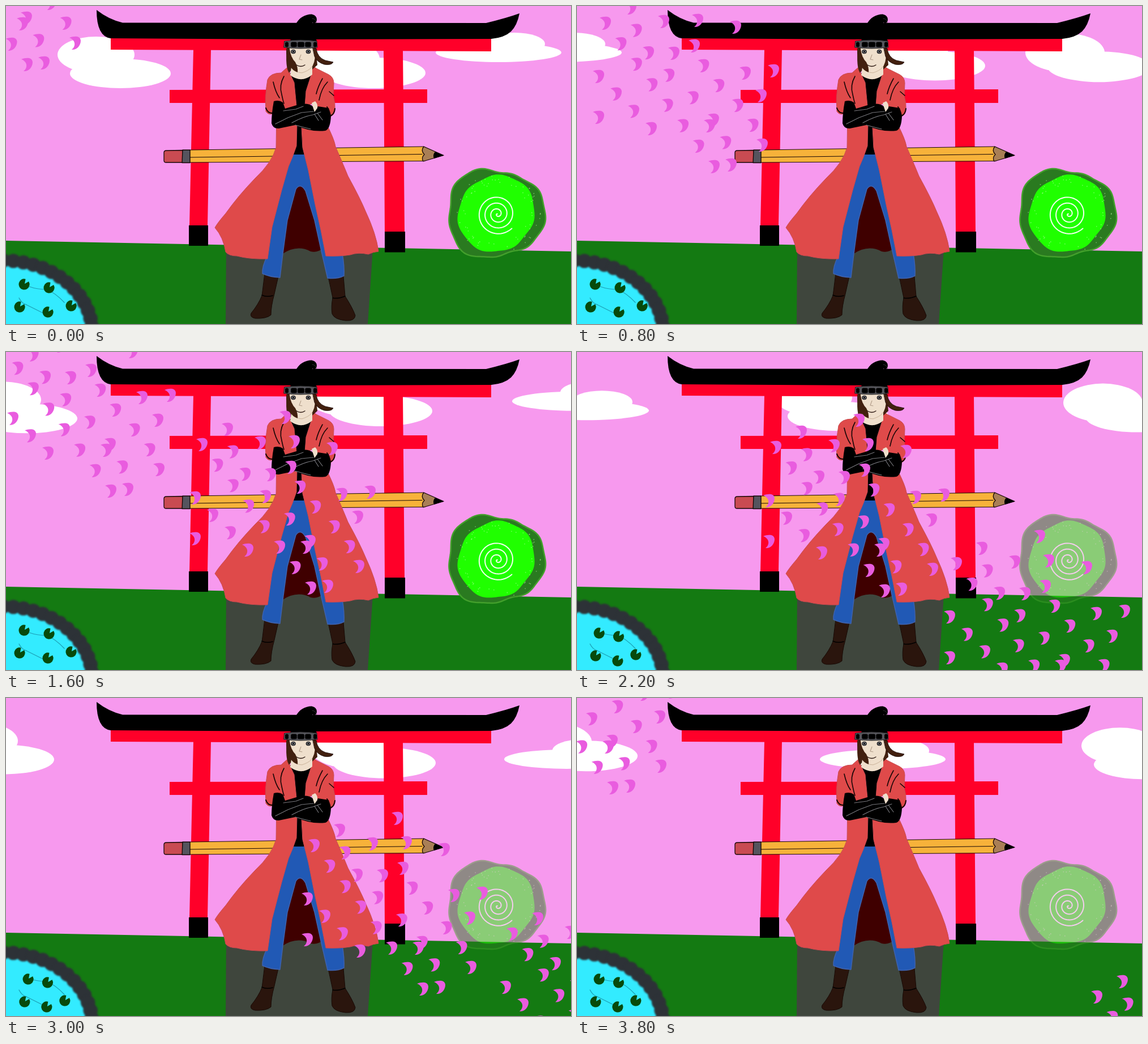
Write an HTML page with a canvas that moves like this. It is 998 by 561 pixels and loops after 4 s.

```html
<!DOCTYPE html>
<html lang="en">
<head>
<meta charset="utf-8">
<title>Gate and petals</title>
<style>
html, body { margin: 0; width: 100%; height: 100%; overflow: hidden; background: #f799ee; }
canvas { display: block; width: 998px; height: 561px; }
</style>
</head>
<body>
<canvas id="stage" width="998" height="561"></canvas>
<script>
const W = 998, H = 561, STEP = 200, STEPS = 20, TAU = Math.PI * 2;
const { sin, cos, exp } = Math;
const ctx = document.getElementById('stage').getContext('2d');

function shape(c, d, fill, line, width = 1) {
  const p = new Path2D(d);
  if (fill) { c.fillStyle = fill; c.fill(p); }
  if (line) { c.strokeStyle = line; c.lineWidth = width; c.stroke(p); }
}

function oval(c, x, y, rx, ry, fill) {
  c.fillStyle = fill;
  c.beginPath();
  c.ellipse(x, y, rx, ry, 0, 0, TAU);
  c.fill();
}

function layer(paint) {
  const cv = document.createElement('canvas');
  cv.width = W; cv.height = H;
  const c = cv.getContext('2d');
  c.lineCap = c.lineJoin = 'round';
  paint(c);
  return cv;
}

// Piecewise linear value at step k; the end segments run on
function at(steps, values, k) {
  let i = 0;
  while (i < steps.length - 2 && k > steps[i + 1]) i++;
  const f = (k - steps[i]) / (steps[i + 1] - steps[i]);
  return values[i] + (values[i + 1] - values[i]) * f;
}

// Clouds travel right and wrap; x is unwrapped, each puff is [dx, dy, rx, ry]
const marks = [0, 4, 8, 11, 13, 15, 19];
const clouds = [
  { x: [870, 1268, 2305, 2616, 3147, 3591, 4440],
    y: k => 82 + 26 / (1 + exp(9.5 - k)),
    puffs: [[28, -15, 54, 20], [0, 0, 111, 17]] },
  { x: [650, 922, 1962, 2289, 2798, 3268, 3916],
    y: k => 110 + 8 * cos(TAU * k / 13),
    puffs: [[-60, -25, 70, 34], [0, 0, 91, 27]] },
  { x: [202, 632, 1337, 1761, 2269, 2596, 3602],
    y: k => 112 + 7 * cos(TAU * k / 9),
    puffs: [[-43, -33, 68, 32], [0, 0, 89, 26]] }
];

function drawClouds(k) {
  for (const { x, y, puffs } of clouds) {
    const cx = (at(marks, x, k) + 150) % 1300 - 150;
    for (const [dx, dy, rx, ry] of puffs) oval(ctx, cx + dx, y(k) + dy, rx, ry, '#fff');
  }
}

// A flock is a few diagonal strings of petals: from, to, count, sideways swing
const strings = [
  [50, 30, 242, 283, 8, 0], [95, 3, 272, 280, 8, -20], [207, 70, 327, 245, 6, -8],
  [38, 124, 131, 216, 4, 0], [153, 27, 171, 83, 2, 0], [197, -18, 347, 114, 2, 0],
  [213, 25, 280, 37, 2, 0], [297, 118, 325, 158, 2, 0], [38, 196, 234, 211, 2, 0]
];
const flock = strings.flatMap(([x0, y0, x1, y1, n, swing]) => Array.from({ length: n }, (_, i) => {
  const f = i / (n - 1);
  return [x0 + (x1 - x0) * f + swing * sin(TAU * f), y0 + (y1 - y0) * f];
}));
const drifts = [
  { steps: [0, 4, 8, 11, 13, 15], x: [-205, 0, 296, 620, 700, 844], y: [-180, 0, 133, 343, 379, 386] },
  { steps: [8, 11, 13, 15, 19], x: [-57, 301, 380, 494, 868], y: [-38, 138, 185, 230, 497] },
  { steps: [16, 19], x: [-330, -179], y: [-270, -125] }
];
const petal = new Path2D('M-10,-9 C-2,-12 9,-13 10,-4 C10,5 3,13 -6,12 C2,6 1,-5 -10,-9Z');

function drawPetals(k) {
  ctx.fillStyle = '#e95cdf';
  for (const { steps, x, y } of drifts) {
    const dx = at(steps, x, k), dy = at(steps, y, k);
    for (const [px, py] of flock) {
      ctx.save();
      ctx.translate(dx + px, dy + py);
      ctx.fill(petal);
      ctx.restore();
    }
  }
}

// Lily pads huddle together on every other step
const pads = [[32, 491], [76, 497], [24, 531], [115, 529], [74, 540]];

function drawPads(k) {
  const near = k % 2;
  ctx.fillStyle = '#074a0b';
  for (const [px, py] of pads) {
    const x = px + near * (64 - px) * 0.22, y = py + near * 5;
    ctx.beginPath();
    ctx.moveTo(x + 1, y - 1);
    ctx.arc(x, y, 9.6, -0.55, TAU - 1.3);
    ctx.fill();
  }
}

const gate = layer(c => {
  const red = '#ff0029';
  shape(c, 'M0,414L998,433V561H0Z', '#147a12');
  shape(c, 'M389,421L648,428L639,561H388Z', '#3f463d');
  shape(c, 'M331,76H362L356,388H324ZM667,78H701L704,399H669Z', red);
  shape(c, 'M289,148L744,147V171H289ZM185,55L857,57V80L185,77Z', red);
  shape(c, 'M160,7Q182,24 206,29.500L848,30Q885,21 907,13Q903,34 892,45Q880,56 857,58L520,59L185,57Q160,54 160,7Z', '#000');
  shape(c, 'M323,387H357V423H323ZM669,398H705V434.500H669Z', '#000');
});

const portal = layer(c => {
  const ring = (radius, fill, line) => {
    c.beginPath();
    for (let a = 0; a < TAU; a += 0.04) c.lineTo(868 + cos(a) * radius(a), 366 + sin(a) * radius(a));
    c.closePath();
    c.fillStyle = fill;
    c.fill();
    if (line) { c.strokeStyle = line; c.lineWidth = 2.5; c.stroke(); }
  };
  ring(a => 82 + 5 * cos(2 * a) - 2.5 * cos(4 * a) + 4 * (cos(3 * a) - cos(a)) + 1.5 * sin(9 * a), '#2a7a20', '#43a02c');
  ring(a => 67.5 - cos(a) * 2 - 2.5 * sin(2 * a) + 1.3 * sin(7 * a), '#20ff00');

  let seed = 7;
  const rnd = () => (seed = seed * 16807 % 2147483647) / 2147483647;
  c.globalAlpha = 0.45;
  for (let i = 0; i < 70; i++) {
    const a = rnd() * TAU, r = 0.7 + rnd() * 0.27;
    oval(c, 868 + cos(a) * 80 * r, 366 + sin(a) * 71 * r, 0.9, 0.9, '#d6ffc4');
  }
  c.globalAlpha = 1;

  c.strokeStyle = '#f2ffee';
  c.lineWidth = 2;
  c.beginPath();
  const turn = 3.5 * TAU;
  for (let s = 0; s <= turn; s += 0.1) {
    const r = 36 * (1 - s / turn), a = TAU / 8 + s;
    c.lineTo(868 + cos(a) * r, 367 + sin(a) * r);
  }
  c.stroke();
});

const pond = layer(c => {
  c.filter = 'blur(1.4px)';
  oval(c, -5, 575, 152, 120, '#33ebff');
  for (let a = 0; a < 1.6; a += 0.115) oval(c, -5 + 157 * sin(a), 575 - 126 * cos(a), 12.8, 12.5, '#2d3237');
  c.filter = 'none';
  shape(c, 'M41,495Q55,500 72,500Q87,506 103,523M23,515Q28,525 36,527L66,542', null, '#1d9fb6', 1.3);
});

const hero = layer(c => {
  const coat = '#df4a4a', edge = '#c84a50', ink = '#150505', skin = '#efdfcc', hair = '#42200f';

  // Pencil
  shape(c, 'M325,254L738,248L740,273.500L325,276Z', '#f7b23a', ink);
  shape(c, 'M325,267L735,261.500', null, ink, 1.2);
  shape(c, 'M283,255L312,254.500V276L282,276Q279,276 279,272V259Q279,255 283,255Z', '#c94b52', ink, 1.3);
  shape(c, 'M312,254H325V276.500H311Z', '#55545e', ink, 1.3);
  shape(c, 'M738,248L773,263.500L737,274Q733,267 739,262Q732,255 738,248Z', '#a97f56', ink, 1.3);
  shape(c, 'M758,257L773,263.500L756,269Q753,263 758,257Z', '#000');

  // Lining, boots, jeans
  shape(c, 'M510,305H535L560,427Q550,436 538,433Q514,420 487,438L480,437L500,330Z', '#3f0000');
  shape(c, 'M457,474L481,477L474,508Q468,530 468,545Q460,552 440,551Q430,549 433,542Q446,526 452,511Z', '#2a150d', '#180a05');
  shape(c, 'M570,480L596,477L599,512Q612,532 617,546Q616,556 600,555Q580,553 576,543Q574,530 577,515Z', '#2a150d', '#180a05');
  shape(c, 'M452,510Q460,514 471,511M577,515Q586,517 599,512', null, '#000', 1.6);
  shape(c, 'M504,261H530L540,315L550,365L567,430L594,436Q598,460 597,476Q585,482 568,480L556,428L545,378L529,326Q520,311 512,323L497,378L489,437L484,479Q465,478 453,472Q452,460 461,442L470,382L498,278Z', '#2159b5', '#3f62ad', 1.5);

  // Shirt
  shape(c, 'M502,118H541L528,178V210L527,262H504L511,245L512,178Z', '#000');

  // Coat skirts
  shape(c, 'M478,208H514L513,247Q506,268 499,283L487,325L470,390L462,446Q430,447 408,441Q394,441 388,434Q384,408 369,391Q374,382 388,366Q410,335 440,304Q470,276 477,250Z', coat, edge);
  shape(c, 'M522,208H566Q580,235 582,248Q598,285 604,300Q626,340 635,362Q654,402 658,433Q648,434 640,438Q622,434 608,439Q590,442 565,441L556,395L546,350L534,290L524,250Z', coat, edge);

  // Coat top
  shape(c, 'M500,106Q492,112 486,118Q467,118 462,130Q457,158 459,186Q464,193 471,190L473,172Q484,164 494,184L513,176L509,135L501,118Z', coat, edge);
  shape(c, 'M541,105L548,110L570,121Q579,126 579,136L578,158Q582,172 581,184Q580,192 573,195L567,180L547,182L548,170L528,176L530,150L538,125Z', coat, edge);

  // Folded arms
  shape(c, 'M473,168Q482,165 489,170L493,181L520,173Q536,171 543,178L546,185L551,177L570,180L574,194Q573,217 564,220Q538,223 511,210L482,216Q472,217 469,207Q469,190 473,168Z', '#000');
  shape(c, 'M540,171L546,168Q551,172 550,180L545,187L542,178Z', skin);
  shape(c, 'M476,208L498,197L522,188L543,186M490,185L512,182L525,177M505,206Q525,195 542,192L556,187M545,191L552,202M550,189L559,201M511,210Q525,214 538,217', null, '#77777c', 1.2);
  shape(c, 'M491,124Q482,140 487,156Q489,166 491,172M472,134Q476,152 483,162M568,134Q557,145 553,166M559,128Q551,142 548,155M579,158L571,151', null, ink, 1.6);
  shape(c, 'M459,180Q462,189 470,189M567,178Q572,185 573,194Q580,191 581,181', null, ink, 2);

  // Head
  shape(c, 'M496,74H506L508,108L500,118Q493,108 496,74Z', hair);
  shape(c, 'M538,74H547L550,104L541,112Z', hair);
  shape(c, 'M501,74H544Q549,92 541,107L541,121Q522,137 502,122L504,108Q499,94 501,74Z', skin);
  shape(c, 'M508,110Q518,122 528,116Q538,112 541,106', null, '#cbb49b');
  shape(c, 'M495,75L501,76Q503,91 511,99Q516,108 515,117Q506,114 502,106Q494,95 495,75Z', hair);
  shape(c, 'M542,74L548,75Q550,91 564,96L578,99Q575,105 562,103Q549,99 545,89Z', hair, ink, 0.8);
  for (const x of [507.5, 534]) {
    oval(c, x, 80.5, 4.3, 3.8, '#18181c');
    oval(c, x, 80.5, 2.8, 2.4, '#85858c');
    oval(c, x, 80.5, 1.5, 1.5, '#000');
  }
  shape(c, 'M521,86L518,94L523,95', null, '#b29c88', 1.1);
  shape(c, 'M513,104Q521,109 528,104', null, '#2b1711', 1.3);

  // Hat
  shape(c, 'M502,62Q505,46 513,30Q522,15 540,14.500Q550,17 549,25Q547,33 541,29Q543,46 549,62Z', '#000');
  shape(c, 'M541,22Q548,23 548,29', null, '#333');
  shape(c, 'M492,62Q520,58 549,62L550,73Q520,77 491,73Z', '#55555b', '#222');
  c.fillStyle = '#000';
  for (let i = -2; i <= 2; i++) {
    const w = 12 - 1.5 * i * i;
    c.beginPath();
    c.roundRect(521 + 12.5 * i - w / 2, 63.5, w, 9, 2.5);
    c.fill();
  }
});

function draw(k) {
  ctx.fillStyle = '#f799ee';
  ctx.fillRect(0, 0, W, H);
  drawClouds(k);
  ctx.drawImage(gate, 0, 0);
  ctx.globalAlpha = k % 4 < 2 ? 1 : 0.5;
  ctx.drawImage(portal, 0, 0);
  ctx.globalAlpha = 1;
  ctx.drawImage(pond, 0, 0);
  drawPads(k);
  ctx.drawImage(hero, 0, 0);
  drawPetals(k);
}

const start = performance.now();
let last = -1;
function tick() {
  const k = Math.floor((performance.now() - start) / STEP) % STEPS;
  if (k !== last) draw(last = k);
  requestAnimationFrame(tick);
}
tick();
</script>
</body>
</html>
```
